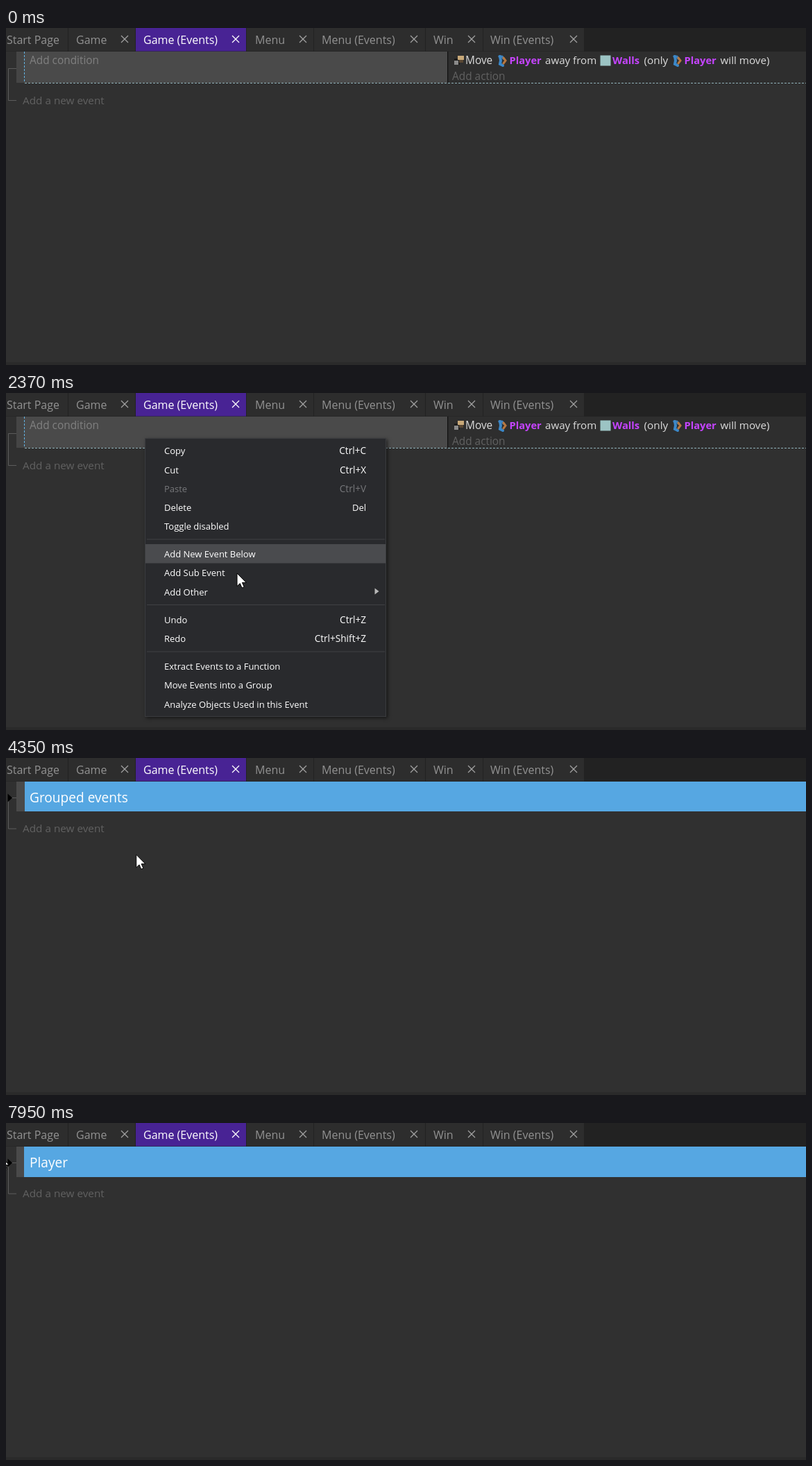
These frames come from a looping animation (1153x486 px, 8000 ms). An HTML page with a canvas:

```html
<!DOCTYPE html>
<html lang="en">
<head>
<meta charset="utf-8">
<title>Event sheet</title>
<style>
html, body { margin: 0; width: 100%; height: 100%; overflow: hidden; background: #303030; }
canvas { display: block; }
</style>
</head>
<body>
<canvas id="stage" width="1153" height="486"></canvas>
<script>
const ctx = document.getElementById('stage').getContext('2d');
const LOOP = 8000;
const MENU_OPEN = 1390, MENU_CLOSE = 3210, GROUPED = 3270;
const EDIT = 4700, DRAG = 5440, COMMIT = 7950;
const TITLE = 'Grouped events';

// Pointer path: time, x, y
const path = [
  [250, 940, 510], [280, 911, 468], [430, 560, 270], [590, 220, 100],
  [750, 126, 56], [870, 126, 56], [900, 122, 55], [1060, 162, 62], [1240, 201, 65],
  [1760, 201, 65], [1900, 268, 97], [1950, 282, 98], [2140, 318, 170],
  [2370, 333, 260], [2540, 329, 344], [2700, 325, 395], [2880, 323, 413],
  [3640, 323, 413], [3710, 322, 408], [3840, 322, 408], [4230, 220, 200],
  [4600, 142, 57], [4700, 142, 57], [4720, 142, 60], [5090, 142, 60],
  [5320, 216, 58], [5440, 216, 58], [5650, 90, 57], [5860, -9, 47], [8000, -9, 47]
];

const typed = [[6810, 'P'], [7070, 'l'], [7250, 'a'], [7460, 'y'], [7590, 'e'], [7750, 'r']];

const tabs = [
  ['Start Page', 1, -20, 89], ['Game', 101, 171, 186], ['Game (Events)', 198, 331, 346],
  ['Menu', 359, 428, 443], ['Menu (Events)', 455, 588, 604], ['Win', 616, 671, 687],
  ['Win (Events)', 698, 818, 833]
];

const items = [
  [83, 'Copy', 'Ctrl+C'], [110.5, 'Cut', 'Ctrl+X'], [138, 'Paste', 'Ctrl+V'],
  [165, 'Delete', 'Del'], [192, 'Toggle disabled'], [232, 'Add New Event Below'],
  [259, 'Add Sub Event'], [286.5, 'Add Other'], [326.5, 'Undo', 'Ctrl+Z'],
  [354, 'Redo', 'Ctrl+Shift+Z'], [394, 'Extract Events to a Function'],
  [421, 'Move Events into a Group'], [448.5, 'Analyze Objects Used in this Event']
];

const font = (size, weight = 400) => `${weight} ${size}px "Open Sans", "Noto Sans", sans-serif`;

function rect(x, y, w, h, color) {
  ctx.fillStyle = color;
  ctx.fillRect(x, y, w, h);
}

function text(str, x, y, size, color, weight, align = 'left') {
  ctx.font = font(size, weight);
  ctx.textAlign = align;
  ctx.fillStyle = color;
  ctx.fillText(str, x, y);
}

function trace(pts, x = 0, y = 0) {
  ctx.beginPath();
  for (let i = 0; i < pts.length; i += 2) ctx.lineTo(x + pts[i], y + pts[i + 1]);
}

function line(pts, color, width = 1) {
  trace(pts);
  ctx.strokeStyle = color;
  ctx.lineWidth = width;
  ctx.stroke();
}

function shape(pts, x, y, fill, edge) {
  trace(pts, x, y);
  ctx.closePath();
  ctx.fillStyle = fill;
  ctx.fill();
  if (!edge) return;
  ctx.strokeStyle = edge;
  ctx.lineWidth = 1;
  ctx.stroke();
}

// Speed at a key; zero next to a rest
function slope(i, axis) {
  const a = path[i - 1], b = path[i], c = path[i + 1];
  if (!a || !c || a[axis] === b[axis] || b[axis] === c[axis]) return 0;
  return (c[axis] - a[axis]) / (c[0] - a[0]);
}

function pointer(t) {
  let i = path.findIndex(k => k[0] > t) - 1;
  if (i < 0) i = t < path[0][0] ? 0 : path.length - 2;
  const a = path[i], b = path[i + 1], d = b[0] - a[0];
  const u = Math.max(0, Math.min(1, (t - a[0]) / d));
  const at = k => {
    const u2 = u * u, u3 = u2 * u;
    return (2 * u3 - 3 * u2 + 1) * a[k] + (u3 - 2 * u2 + u) * d * slope(i, k)
      + (3 * u2 - 2 * u3) * b[k] + (u3 - u2) * d * slope(i + 1, k);
  };
  return { x: at(1), y: at(2) };
}

function drawTabs() {
  rect(0, 0, 1153, 34, '#222222');
  let left = 0;
  for (const [name, x, close, right] of tabs) {
    const active = name === 'Game (Events)';
    rect(left, 0, right - left, 33.5, active ? '#482394' : '#2d2d2d');
    text(name, x, 22.5, 16, active ? '#ffffff' : '#929292');
    const color = active ? '#ffffff' : '#a0a0a0';
    line([close - 5, 11, close + 5, 21], color, 1.2);
    line([close + 5, 11, close - 5, 21], color, 1.2);
    left = right + 1;
  }
}

function playerIcon(x) {
  ctx.lineCap = 'round';
  line([x + 2, 41, x + 6, 41.5, x + 8, 44], '#3d7fb8', 3.5);
  line([x + 3, 41, x + 4, 47, x + 3, 52, x + 7, 54], '#3c88c8', 4);
  line([x + 8, 43, x + 11, 47, x + 8, 51], '#b8783f', 3);
  ctx.lineCap = 'butt';
}

function drawEvent(hover) {
  rect(15, 34, 622, 45, '#4a4a4a');
  rect(15, 34, 11, 45, '#454545');
  rect(636, 34, 1.5, 45, '#111111');
  rect(637.5, 34, 515.5, 45, '#2e2e2e');
  ctx.setLineDash([3, 2]);
  line([26.5, 34, 26.5, 79], '#62b4e4');
  line([27, 79.5, 1153, 79.5], '#8fb0b8');
  ctx.setLineDash([]);
  line([15, 58.5, 3.5, 58.5, 3.5, 104.5, 15, 104.5], '#5c5c5c');
  text('Add condition', 34, 52, 15.4, hover ? '#cccccc' : '#808080');
  text('Add action', 643, 75, 15.4, '#616161');
  text('Add a new event', 24, 110, 15.3, '#616161');

  rect(646, 44, 8, 9, '#1c1c1c');
  rect(646, 47, 6, 6, '#8a8a8a');
  rect(651, 40, 9, 6, '#c8a878');
  rect(653, 46, 6, 4, '#584632');
  playerIcon(709);
  playerIcon(961);
  rect(856.5, 39.5, 15, 15, '#9cc4c4');
  const plain = '#dcdcdc', bright = '#c544ff';
  text('Move', 662, 52, 15.4, plain);
  text('Player', 725.5, 52, 14.7, bright, 700);
  text('away from', 777, 52, 15.1, plain);
  text('Walls', 874, 52, 14.7, bright, 700);
  text('(only', 919.5, 52, 15.3, plain);
  text('Player', 977.5, 52, 14.7, bright, 700);
  text('will move)', 1029.5, 52, 15.2, plain);
}

function drawMenu(t, alpha) {
  const y = pointer(t - 40).y;
  ctx.globalAlpha = alpha;
  ctx.shadowColor = 'rgba(0,0,0,.55)';
  ctx.shadowBlur = 5;
  ctx.shadowOffsetX = ctx.shadowOffsetY = 2;
  rect(200, 65, 348, 402, '#3b3c3f');
  ctx.shadowColor = 'transparent';
  rect(201, 66, 346, 400, '#292a2d');
  for (const sep of [211, 305.5, 373]) rect(203, sep - .5, 343, 1, '#404144');
  for (const [mid, name, keys] of items) {
    if (t > 1760 && Math.abs(y - mid) < 13.7) rect(201, mid - 14, 346, 27.5, '#4a4b4e');
    const color = name === 'Paste' ? '#77787b' : '#ffffff';
    text(name, 228, mid + 5, 13, color);
    if (keys) text(keys, 519, mid + 5, keys === 'Del' ? 13 : 13.6, color, 400, 'right');
  }
  shape([0, -4.5, 6, 0, 0, 4.5], 531.5, 286, '#b8b8b8');
  ctx.globalAlpha = 1;
}

function drawGroup(t, m) {
  const editing = t >= EDIT && t < COMMIT;
  const over = m.x >= 34 && m.y < 74;
  rect(15, 34, 12, t < EDIT ? 43 : 44, '#4a4a4a');
  if (t < EDIT) rect(27, 34, 1126, 43, '#56a7e2');
  else rect(26, 34, 1127, 44, '#56a7e2');
  if (over && editing) rect(34, 34, 1119, 44, '#66afe5');
  else if (over) rect(34, 41, 1119, 31, '#66afe5');
  line([15, 57.5, 3.5, 57.5, 3.5, 102, 15, 102], '#5c5c5c');
  shape([0, -6, 6.5, 0, 0, 6], 2.5, 57.5, '#000000');
  text('Add a new event', 24, 107, 15.3, '#616161');

  const word = typed.filter(k => t >= k[0]).map(k => k[1]).join('') || TITLE;
  if (!editing) {
    text(word, 34, 63.5, 19.1, '#ffffff', 500);
    return;
  }
  ctx.font = font(19, 500);
  const wide = n => 47 + ctx.measureText(word.slice(0, n)).width;
  const end = wide(word.length);
  const selecting = t >= DRAG && t < typed[0][0];
  if (selecting) {
    let n = 0;
    while (n < word.length && (wide(n) + wide(n + 1)) / 2 < m.x) n++;
    rect(wide(n), 41, end - wide(n), 27, '#0078d7');
  }
  text(word, 47, 62.5, 19, '#ffffff', 500);
  if (!selecting) rect(Math.round(end), 41, 1, 27, '#ffffff');
}

function drawPointer(t, { x, y }) {
  const onCondition = t < MENU_OPEN && x > 30 && x < 136 && y < 58;
  const onTitle = t > GROUPED && t < EDIT && y < 74;
  if (onCondition || onTitle) {
    shape([-1, 1, .5, -.5, 2, -.5, 3.5, 1, 3.5, 7.5, 6.5, 7.5, 9.5, 8.8, 12, 10.5, 12, 17,
      10, 21, 10, 25, -1, 25, -2, 21, -7.5, 14, -7.5, 12, -5, 11.2, -1, 14.5], x, y, '#ffffff', '#000000');
    for (const k of [3.5, 6.5, 9.3]) line([x + k, y + 8.5, x + k, y + 13], '#222222', .8);
  } else if (t >= EDIT && x > 8) {
    line([x, y - 6, x, y + 7], '#555555', 1.3);
    for (const k of [-6.5, 7.5]) line([x - 3.5, y + k, x + 3.5, y + k], '#555555', 1.2);
  } else {
    shape([0, 0, 0, 18.6, 4.3, 14.6, 7, 21, 10.2, 19.7, 7.4, 13.4, 13.2, 13.4], x, y, '#ffffff', '#000000');
  }
}

function draw(t) {
  const m = pointer(t);
  rect(0, 0, 1153, 486, '#303030');
  rect(0, 482, 1153, 4, '#2a2a2a');
  drawTabs();
  if (t < GROUPED) {
    drawEvent(t > 590 && t < MENU_OPEN && m.x > 30 && m.x < 136 && m.y < 58);
    if (t >= MENU_OPEN && t < MENU_CLOSE + 30) {
      drawMenu(t, t < MENU_OPEN + 30 || t >= MENU_CLOSE ? .5 : 1);
    }
  } else {
    drawGroup(t, m);
  }
  if (t >= 280) drawPointer(t, m);
}

let start;
function tick(now) {
  start ??= now;
  draw((now - start) % LOOP);
  requestAnimationFrame(tick);
}
draw(0);
requestAnimationFrame(tick);
</script>
</body>
</html>
```
